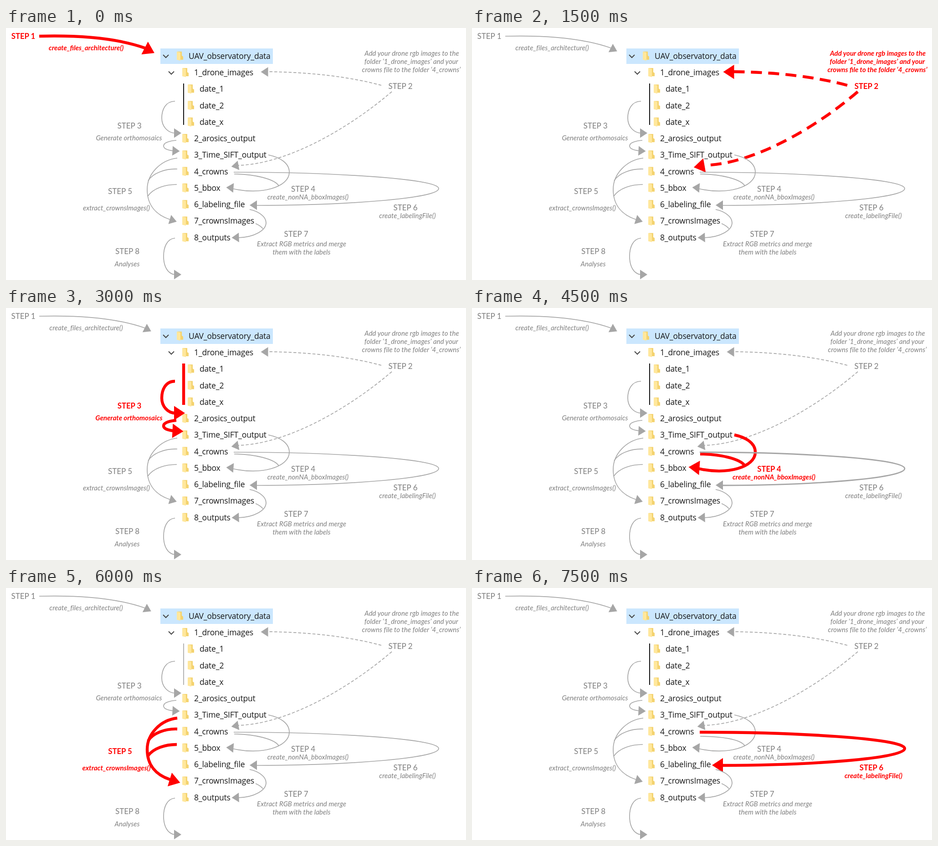
These frames come from a looping animation (1010 px wide and 554 px high, 8 s). An HTML page:

```html
<!DOCTYPE html>
<html lang="en">
<head>
<meta charset="utf-8">
<title>Workflow steps</title>
<style>
html, body { margin: 0; width: 100%; height: 100%; overflow: hidden; background: #fff; }
svg { display: block; }
.tree { font: 17.5px "Open Sans", "Noto Sans", sans-serif; letter-spacing: -.18px; fill: #181818; }
.step text { font: 17px Lato, sans-serif; fill: #7f7f7f; text-anchor: middle; }
.step .note { font-size: 14.9px; font-style: italic; letter-spacing: .1px; }
.line { fill: none; stroke: #a6a6a6; stroke-width: 1.7; }
.dash { stroke-dasharray: 6.5 4; }
.head { fill: #a6a6a6; }
.bar { stroke: #111; stroke-width: 2; }
.on text { font-weight: bold; font-size: 16.7px; fill: #f00; }
.on .note { font-size: 15.1px; letter-spacing: 0; }
.on .line { stroke: #f00; stroke-width: 6.4; }
.on .dash { stroke-dasharray: 24 14; }
.on .head { fill: #f00; transform: scale(1.5); }
.at4 .s6 .line { stroke-width: 2.8; }
.at5 .bar { stroke: #a6a6a6; stroke-width: 1.7; }
</style>
</head>
<body>
<svg id="stage" width="1010" height="554" viewBox="0 0 1010 554"></svg>
<script>
const rows = ['UAV_observatory_data', '1_drone_images', 'date_1', 'date_2', 'date_x',
  '2_arosics_output', '3_Time_SIFT_output', '4_crowns', '5_bbox',
  '6_labeling_file', '7_crownsImages', '8_outputs'];

// label: [x, y]; notes: [text, x, y]; heads: [base x, base y, angle]
const steps = [
  { label: [38, 24], notes: [['create_files_architecture()', 176, 49]],
    lines: ['M73,18C150,16 240,21 305,44'], heads: [[304.5, 44, 27]] },
  { label: [866, 134], dashed: true,
    notes: [['Add your drone rgb images to the', 891, 61],
      ['folder ‘1_drone_images’ and your', 890, 79],
      ['crowns file to the folder ‘4_crowns’', 890, 97]],
    lines: ['M824,126Q720,98 574,96', 'M847,140C760,215 620,300 508,302'],
    heads: [[575.5, 96.5, 180], [510.5, 302, 170]] },
  { label: [271, 221], notes: [['Generate orthomosaics', 270, 247]],
    lines: ['M371,161C350,161 342,180 342,198C342,216 355,231 372,231',
      'M374,247C360,248 346,252 346,259C346,266 358,269 368,270'],
    heads: [[369, 231, 0], [365.5, 270, 3]], bar: true },
  { label: [652.5, 359.5], notes: [['create_nonNA_bboxImages()', 663, 377]],
    lines: ['M576,279C600,284 622,296 622,317C622,350 560,368 497,353',
      'M501,321C545,321 590,332 599,347'],
    heads: [[499.5, 351.5, 184]] },
  { label: [250.5, 364.5], notes: [['extract_crownsImages()', 242.5, 400.5]],
    lines: ['M376,286C340,290 310,320 310,355C310,390 330,411 360,421',
      'M376,310C350,309 322,319 312,336', 'M375,344C350,344 323,352 311,370'],
    heads: [[359.5, 421, 17]] },
  { label: [877, 401], notes: [['create_labelingFile()', 881.5, 418]],
    lines: ['M500,317C700,317 950,330 950,353C950,375 740,390 548,390'],
    heads: [[551, 389.5, 180]] },
  { label: [637, 459],
    notes: [['Extract RGB metrics and merge', 649, 480], ['them with the labels', 649, 498]],
    lines: ['M535,399C555,403 571,415 571,428C571,445 545,460 510,461',
      'M548,430Q558,434 564,441'],
    heads: [[511.5, 460.5, 178]] },
  { label: [266.5, 497], notes: [['Analyses', 266, 524]],
    lines: ['M371,462C353,463 346,483 346,502C346,524 355,540 370,542'],
    heads: [[369, 542, 0]] },
];

const each = (list, draw) => list.map(draw).join('');

function treeRow(name, i) {
  const x = i === 0 ? 375 : i > 1 && i < 5 ? 399 : 387;
  const y = 61.7 + i * 36.27;
  return `<g transform="translate(${x} ${y - 10})">
    <path d="M1,0H11V9L14,11V18H1Z" fill="#f4d370"/><path d="M0,0L8,2V20L0,18Z" fill="#ffe79c"/></g>
    <text x="${x + 26}" y="${y + 6}">${name}</text>`;
}

function stepGroup(s, i) {
  const lineClass = s.dashed ? 'line dash' : 'line';
  return `<g class="step s${i + 1}">
    ${s.bar ? '<path class="line bar" d="M390,122V213"/>' : ''}
    ${each(s.lines, d => `<path class="${lineClass}" d="${d}"/>`)}
    ${each(s.heads, ([x, y, a]) => `<g transform="translate(${x} ${y}) rotate(${a})">
      <path class="head" d="M0,-10.500L16,0L0,10.500Z"/></g>`)}
    <text x="${s.label[0]}" y="${s.label[1]}">STEP ${i + 1}</text>
    ${each(s.notes, ([t, x, y]) => `<text class="note" x="${x}" y="${y}">${t}</text>`)}
  </g>`;
}

const stage = document.getElementById('stage');
stage.innerHTML = `<rect x="339" y="45" width="247" height="34" fill="#cbe7fe"/>
  <path d="M345,59l6,6l6,-6M357,95.500l6,6l6,-6" fill="none" stroke="#444" stroke-width="2"/>
  <g class="tree">${each(rows, treeRow)}</g>${each(steps, stepGroup)}`;

const groups = [...stage.querySelectorAll('.step')];
const branch = groups[3].querySelectorAll('.line')[1];
let shown = 0;

function frame(now) {
  const active = Math.floor(now % 8000 / 1500) + 1;
  if (active !== shown) {
    shown = active;
    stage.setAttribute('class', 'at' + active);
    groups.forEach((g, i) => g.classList.toggle('on', i + 1 === active));
    // The branch from 4_crowns makes room for the thick line above it
    const y = active === 6 ? 326 : 321;
    branch.setAttribute('d', `M501,${y}C545,${y} 590,332 599,347`);
  }
  requestAnimationFrame(frame);
}
frame(performance.now());
</script>
</body>
</html>
```
